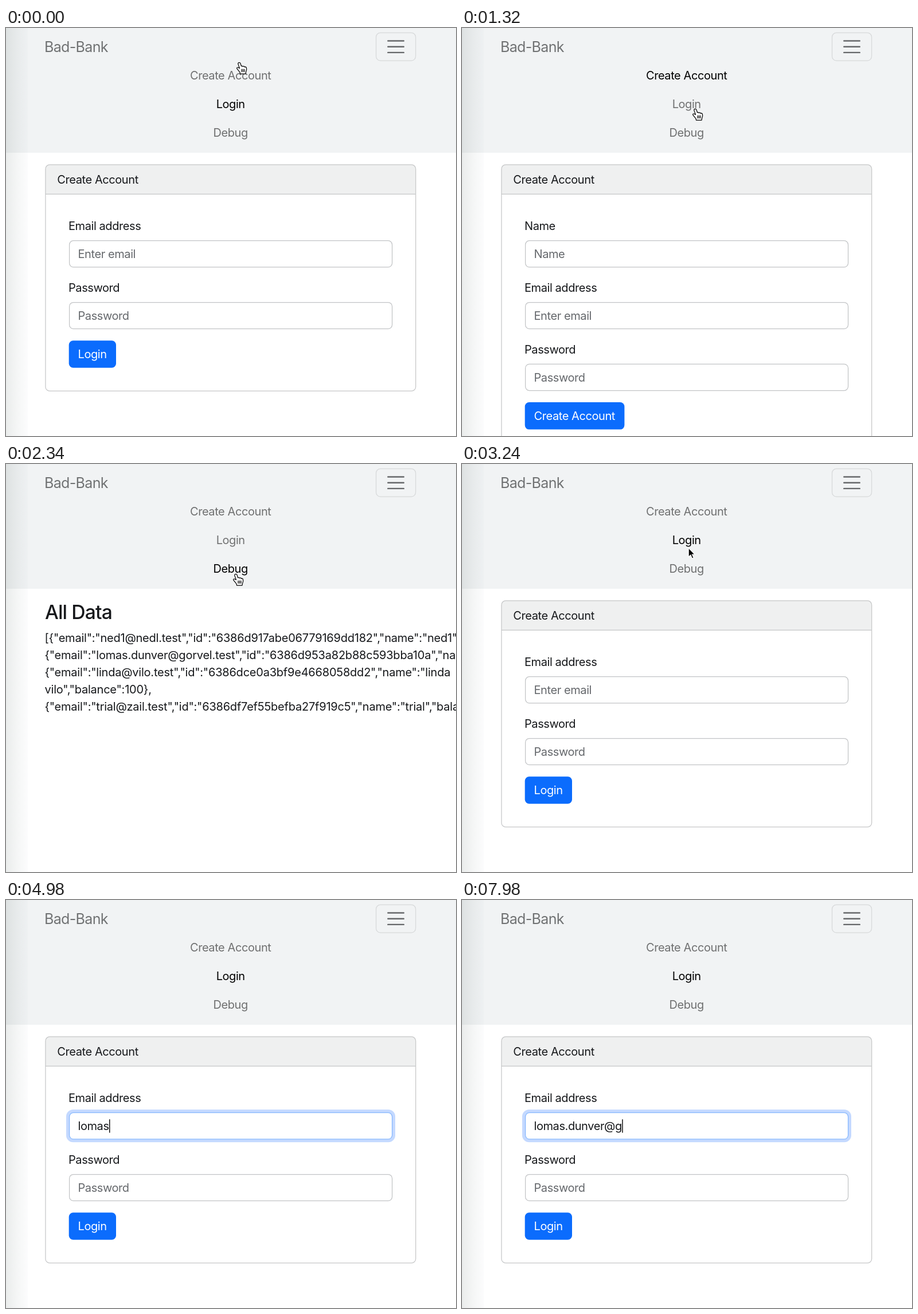
An HTML page that plays this animation: 785x713 px, repeating every 8000 ms.

```html
<!DOCTYPE html>
<html lang="en">
<head>
<meta charset="utf-8">
<title>Bank form</title>
<style>
  html, body { margin: 0; width: 100%; height: 100%; overflow: hidden; background: #fff; }
  svg { display: block; width: 785px; height: 713px; }
  text { font: 20px Inter, "Open Sans", sans-serif; letter-spacing: -.42px; fill: #16181b; white-space: pre; }
  .brand { font-size: 25px; letter-spacing: -.65px; fill: #707273; }
  .nav text { text-anchor: middle; fill: #000; }
  .hint { fill: #65686c; }
  .title { font-size: 33.6px; font-weight: 500; letter-spacing: -.84px; }
  .data text { letter-spacing: -.22px; }
  .btn rect { fill: #0b6cfd; }
  .btn text { fill: #fff; }
  .box { fill: #fff; stroke: #c2c4c6; stroke-width: 1.25; }
  .edge { fill: none; stroke: #c6c7c8; stroke-width: 1.25; }
</style>
</head>
<body>
<svg viewBox="0 0 785 713">
  <defs>
    <linearGradient id="shade">
      <stop offset="0" stop-color="#51645e" stop-opacity=".12"/>
      <stop offset=".5" stop-color="#51645e" stop-opacity=".06"/>
      <stop offset="1" stop-color="#5c7180" stop-opacity=".02"/>
    </linearGradient>
  </defs>
  <rect width="785" height="713" fill="#fff"/>
  <rect width="785" height="218" fill="#f1f3f4"/>
  <rect width="38" height="713" fill="url(#shade)"/>
  <text class="brand" x="67" y="42">Bad-Bank</text>
  <rect x="645.6" y="8.3" width="69" height="48.8" rx="7.5" fill="none" stroke="#d7d9da" stroke-width="1.25"/>
  <path d="M666.3 22.5h27.5m-27.5 10.2h27.5m-27.5 10.2h27.5" stroke="#66686a" stroke-width="2.4" stroke-linecap="round"/>
  <g class="nav" id="nav"></g>
  <g id="login"></g>
  <g id="create"></g>
  <g id="debug"></g>
  <g id="cursor">
    <g id="hand" stroke="#000" stroke-width="1.25" stroke-linejoin="round" stroke-linecap="round">
      <path transform="translate(-5.5 -.6)" fill="#fff" d="M5.5 1C3.5 1 3 2.5 3.5 4L6 11 4 9.8C2 8.7.4 10 1.5 11.8L6.5 18 7 20.6H16.5L17 17.5C18.2 15 18.6 13 18 10.5 17.6 8.6 15.8 8 15 9 14.5 7.2 12.5 7 11.7 8 11 6.6 9.6 6.7 9 7.3L7.5 2.5C7 1.3 6.3 1 5.5 1Z"/>
      <path transform="translate(-5.5 -.6)" fill="none" d="M9.6 12.6v4.4M12 12.6v4.4M14.4 12.6v4.4"/>
    </g>
    <path id="arrow" d="M0 0V16L3.8 12.6 6.4 18.6 9 17.5 6.5 11.7H11.3Z" fill="#000" stroke="#fff" stroke-width="1.25"/>
    <path id="beam" d="M-3-9Q0-9 0-6.5Q0-9 3-9M0-6.5V7M-3 9.5Q0 9.5 0 7Q0 9.5 3 9.5" fill="none" stroke="#222" stroke-width="1.25"/>
  </g>
</svg>
<script>
const LOOP = 8000, ROW = 107.8, LEFT = 126;
const $ = id => document.getElementById(id);

const text = (x, y, s, cls = '') => `<text class="${cls}" x="${x}" y="${y}">${s}</text>`;

const field = (row, label, hint) => {
  const y = row * ROW;
  return text(109, y + 353.3, label) +
    `<rect class="box" x="110.6" y="${y + 371.7}" width="563" height="46.2" rx="7"/>` +
    text(125.5, y + 402.3, hint, 'hint');
};

const button = (row, w, label) =>
  `<g class="btn"><rect x="109.7" y="${330.6 + row * ROW}" width="${w}" height="47.6" rx="7.5"/>` +
  text(125.5, 361.5 + row * ROW, label) + '</g>';

const card = (labels, hints, w, action) => {
  const n = labels.length;
  return '<path d="M69 290V246Q69 239 76 239H707.5Q714.5 239 714.5 246V290Z" fill="#eff0f0"/>' +
    `<rect class="edge" x="68.9" y="238.8" width="645.8" height="${180 + n * ROW}" rx="7.5"/>` +
    '<path class="edge" d="M69 290.3H714.7"/>' + text(89.3, 272.2, 'Create Account') +
    labels.map((label, i) => field(i, label, hints[i])).join('') + button(n, w, action);
};

$('login').innerHTML =
  '<rect id="ring" x="107.5" y="368.8" width="569" height="52" rx="9.5" fill="none" stroke="#c4d9ff" stroke-width="5"/>' +
  card(['Email address', 'Password'], ['Enter email', 'Password'], 82.3, 'Login') +
  '<text id="typed" x="125.5" y="402.3"></text>' +
  '<rect id="caret" y="383.3" width="1.4" height="23.4" fill="#000"/>';
$('create').innerHTML =
  card(['Name', 'Email address', 'Password'], ['Name', 'Enter email', 'Password'], 173.7, 'Create Account');

const users = [
  ['ned1@nedl.test', '6386d917abe06779169dd182', 'ned1'],
  ['lomas.dunver@gorvel.test', '6386d953a82b88c593bba10a', 'lomas'],
  ['linda@vilo.test', '6386dce0a3bf9e4668058dd2', 'linda\nvilo'],
  ['trial@zail.test', '6386df7ef55befba27f919c5', 'trial']
];
const dump = '[' + users.map(([email, id, name]) =>
  `{"email":"${email}","id":"${id}","name":"${name}","balance":100}`).join(',\n') + ']';
$('debug').innerHTML = text(68, 271.2, 'All Data', 'title') + '<g id="data" class="data">' +
  dump.split('\n').map((line, i) => text(67.5, 311.3 + i * 30, line)).join('') + '</g>';

const pages = ['create', 'login', 'debug'];
$('nav').innerHTML = ['Create Account', 'Login', 'Debug']
  .map((s, i) => text(391.7, 90.3 + i * 50, s)).join('');
const links = [...$('nav').children];

// [time, page] of each click in the menu
const clicks = [[0, 'login'], [480, 'create'], [1480, 'login'], [2060, 'debug'], [3000, 'login']];
const DATA_AT = 2220, ARROW_AT = 3180, BEAM_AT = 3900, FOCUS = 3940;

// [arrival time, x, y] of the cursor tip
const stops = [
  [0, 407, 60], [300, 407, 82], [1260, 407, 141], [2200, 401, 192],
  [2820, 396, 145], [3720, 224, 442], [4020, 214, 397]
];

// [start time, letters], one letter every KEY ms
const KEY = 90, BLINK = 500;
const bursts = [[4610, 'lomas'], [5080, '.'], [5940, 'dun'], [6570, 'ver'], [7270, '@'], [7790, 'g']];

const clamp = p => Math.max(0, Math.min(1, p));
const ease = p => p * p * (3 - 2 * p);
const latest = (table, t) => table.filter(row => row[0] <= t).pop() || table[0];
const show = (el, on) => { el.style.display = on ? '' : 'none'; };

// Link colours follow the active page with a 150 ms fade.
function linkOpacity(name, t) {
  const [at, page] = latest(clicks, t), [, before] = latest(clicks, at - 1);
  const level = p => p === name ? 1 : .54;
  return level(before) + (level(page) - level(before)) * ease(clamp((t - at) / 150));
}

function tip(t) {
  let [time, x, y] = stops[0];
  for (const [at, nx, ny] of stops.slice(1)) {
    const span = Math.min(500, .6 * (at - time));
    const p = ease(clamp((t - at + span) / span));
    x += (nx - x) * p;
    y += (ny - y) * p;
    time = at;
  }
  return `${x} ${y}`;
}

function typing(t) {
  let typed = '', last = FOCUS;
  for (const [start, letters] of bursts) {
    const n = Math.min(letters.length, Math.floor((t - start) / KEY) + 1);
    if (n < 1) break;
    typed += letters.slice(0, n);
    last = start + (n - 1) * KEY;
  }
  return { typed, caret: t >= FOCUS && Math.floor((t - last) / BLINK) % 2 === 0 };
}

const email = $('login').querySelector('.box');
const hint = $('login').querySelector('.hint');

function draw(t) {
  const page = latest(clicks, t - 20)[1];
  const { typed, caret } = typing(t);
  const shape = typed ? '' : t < ARROW_AT ? 'hand' : t < BEAM_AT ? 'arrow' : 'beam';
  for (const id of pages) show($(id), id === page);
  for (const id of ['hand', 'arrow', 'beam']) show($(id), id === shape);
  show($('data'), t >= DATA_AT);
  links.forEach((el, i) => el.setAttribute('fill-opacity', linkOpacity(pages[i], t)));
  $('cursor').setAttribute('transform', `translate(${tip(t)})`);

  $('ring').setAttribute('opacity', ease(clamp((t - FOCUS) / 150)));
  email.style.stroke = t > FOCUS + 75 ? '#86b7fe' : '';
  show(hint, !typed);
  show($('caret'), caret);
  $('typed').textContent = typed;
  $('caret').setAttribute('x', LEFT + (typed && $('typed').getComputedTextLength()));
}

const begin = performance.now();
function tick() {
  draw((performance.now() - begin) % LOOP);
  requestAnimationFrame(tick);
}
tick();
</script>
</body>
</html>
```
